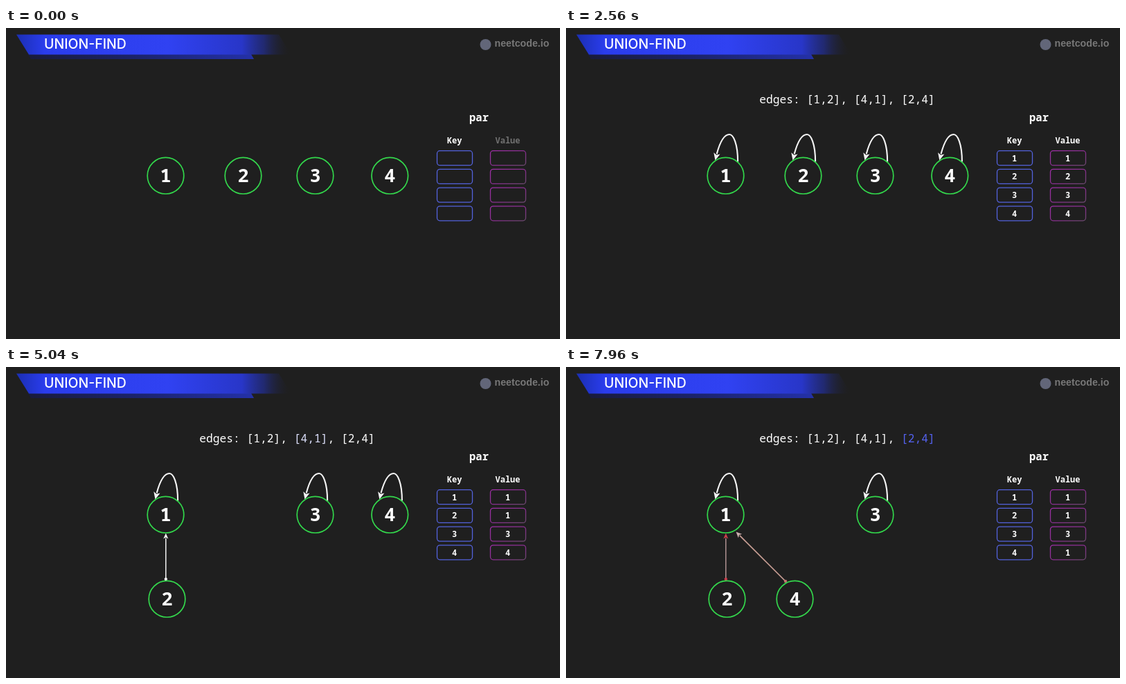
Write an HTML page that moves like this. It is 800 px wide and 450 px high and loops after 8000 ms.

```html
<!DOCTYPE html>
<html lang="en">
<head>
<meta charset="utf-8">
<title>Union-Find</title>
<style>
  html, body { margin: 0; width: 100%; height: 100%; overflow: hidden; background: #1f1f1f; }
  svg { display: block; width: 100vw; height: 100vh; }
  text { fill: #fff; }
  .mono { font-family: "Noto Sans Mono", "DejaVu Sans Mono", monospace; }
  .mid { text-anchor: middle; }
  .blend { isolation: isolate; }
  .blend > g { mix-blend-mode: plus-lighter; }
</style>
</head>
<body>
<svg id="stage" viewBox="0 0 800 450" xmlns="http://www.w3.org/2000/svg">
  <defs>
    <linearGradient id="bar" gradientUnits="userSpaceOnUse" x1="16" y1="0" x2="412" y2="0">
      <stop offset="0" stop-color="#1b2fb4"/>
      <stop offset=".1" stop-color="#2a3cec"/>
      <stop offset=".55" stop-color="#3042f2"/>
      <stop offset=".82" stop-color="#2836c8"/>
      <stop offset=".9" stop-color="#222d8c" stop-opacity=".75"/>
      <stop offset="1" stop-color="#1f1f1f" stop-opacity="0"/>
    </linearGradient>
    <linearGradient id="strip" gradientUnits="userSpaceOnUse" x1="32" y1="0" x2="358" y2="0">
      <stop offset="0" stop-color="#191b3c"/>
      <stop offset=".45" stop-color="#1b2368"/>
      <stop offset="1" stop-color="#2431a8"/>
    </linearGradient>
    <linearGradient id="purple" x1="0" y1="0" x2="1" y2="1">
      <stop offset="0" stop-color="#a02fa8"/>
      <stop offset=".6" stop-color="#86308c"/>
      <stop offset="1" stop-color="#6d4a70"/>
    </linearGradient>
    <filter id="glow" x="-30%" y="-60%" width="160%" height="220%">
      <feGaussianBlur stdDeviation="2.2"/>
    </filter>
  </defs>
  <rect width="800" height="450" fill="#1f1f1f"/>
  <path d="M32 38H354L358 45H36Z" fill="url(#strip)"/>
  <path d="M15 9.5H394L412 38.5H33Z" fill="url(#bar)"/>
  <text x="55" y="29.5" font-size="19.5" font-weight="500" font-family="Inter, sans-serif">UNION-FIND</text>
  <circle cx="692.5" cy="24" r="8" fill="#626679"/>
  <text x="705.5" y="27.3" font-size="14.2" font-weight="700" style="fill:#777" font-family="'Liberation Sans', sans-serif">neetcode.io</text>
</svg>
<script>
const LOOP = 8000;
const WHITE = [244, 244, 244], BLUE = [84, 98, 240];
const stage = document.getElementById('stage');

function el(tag, attrs, parent = stage, label) {
  const node = document.createElementNS('http://www.w3.org/2000/svg', tag);
  for (const k in attrs) node.setAttribute(k, attrs[k]);
  if (label !== undefined) node.textContent = label;
  parent.appendChild(node);
  return node;
}
const set = (node, key, value) => node.setAttribute(key, value);
const ramp = (t, from, to) => Math.min(1, Math.max(0, (t - from) / (to - from)));
const ease = (t, from, to) => { const u = ramp(t, from, to); return u * u * (3 - 2 * u); };
const mix = (a, b, u) => `rgb(${a.map((v, i) => Math.round(v + (b[i] - v) * u))})`;
const mono = (x, y, size, weight, label, mid = true) => el('text', {
  x, y, 'font-size': size, 'font-weight': weight, class: mid ? 'mono mid' : 'mono'
}, stage, label);

// Table
mono(683, 135, 15.5, 600, 'par');
mono(647.7, 167, 12, 700, 'Key');
const valueHead = mono(724.5, 167, 12, 700, 'Value');

function cell(x, y, stroke, bright) {
  const box = { x, y, width: 51, height: 21, rx: 4, fill: 'none' };
  el('rect', { ...box, stroke, 'stroke-width': 1.3 });
  const lit = el('g', { opacity: 0 });
  el('rect', { ...box, stroke: bright[0], 'stroke-width': 5, filter: 'url(#glow)' }, lit);
  el('rect', { ...box, stroke: bright[1], 'stroke-width': 2 }, lit);
  return lit;
}
const rows = [1, 2, 3, 4].map((n, i) => {
  const y = 177.7 + i * 26.7, base = y + 14.8;
  return {
    keyLit: cell(622.5, y, '#5362dc', ['#4157ff', '#a0acff']),
    valueLit: cell(699.5, y, 'url(#purple)', ['#c02fd0', '#e868ee']),
    key: mono(647.6, base, 12, 700, n),
    value: mono(724.6, base, 12, 700, n),
    next: mono(724.6, base, 12, 700, 1)
  };
});

// Edge list
const edges = mono(279.3, 108.6, 16.25, 500, '', false);
set(edges, 'xml:space', 'preserve');
edges.style.whiteSpace = 'pre';
const span = label => el('tspan', {}, edges, label);
span('edges: ');
const pairs = ['[1,2]', '[4,1]', '[2,4]'].map((label, i) => {
  if (i) span(', ');
  return span(label);
});

// Arrows
function arrow(d, width, headLen, headWide, dot) {
  const g = el('g', {});
  const line = el('path', { d, fill: 'none', 'stroke-width': width }, g);
  const h = headWide / 2;
  const head = el('path', { d: `M0 0L${-headLen} ${h}L${-headLen * 0.75} 0L${-headLen} ${-h}Z` }, g);
  const start = dot && el('circle', { cx: dot[0], cy: dot[1], r: 2.2 }, g);
  const total = line.getTotalLength();
  return {
    draw(u, alpha = 1, lineColor = mix(WHITE, WHITE, 0), headColor = lineColor, dotColor = headColor) {
      set(g, 'opacity', u > 0 ? alpha : 0);
      const at = total * u, back = Math.max(0, at - headLen * 0.9);
      const tip = line.getPointAtLength(at);
      const tail = line.getPointAtLength(Math.max(0, Math.min(at - 1, back)));
      const first = line.getPointAtLength(1), zero = line.getPointAtLength(0);
      const angle = at > 1.5
        ? Math.atan2(tip.y - tail.y, tip.x - tail.x)
        : Math.atan2(first.y - zero.y, first.x - zero.x);
      set(line, 'stroke-dasharray', `${back} ${total + 9}`);
      set(line, 'stroke', lineColor);
      set(head, 'transform', `translate(${tip.x} ${tip.y}) rotate(${angle * 180 / Math.PI})`);
      set(head, 'fill', headColor);
      if (start) set(start, 'fill', dotColor);
    }
  };
}
const homeX = [230.5, 342.5, 446.5, 554.3], homeY = 213.7;
const loops = homeX.map(x => arrow(
  `M${x + 17.6} 193.5C${x + 17.6} 167 ${x + 11} 154 ${x + 5.5} 154C${x - 3} 154 ${x - 10} 168 ${x - 15} 191.5`,
  2.1, 10.5, 9.5));
const link2 = arrow('M230.8 307V240.5', 1.5, 8, 7, [230.8, 307]);
const link4 = arrow('M317 310L245.5 238.5', 1.7, 8.5, 7.5, [317, 310]);

// Nodes: overlapping copies along the shutter time give motion blur
const COPIES = 4, SHUTTER = 10;
function node(n, copies) {
  const group = el('g', { class: 'blend' });
  return Array.from({ length: copies }, () => {
    const g = el('g', { opacity: 1 / copies }, group);
    el('circle', { r: 26.3, fill: 'none', stroke: '#32d74b', 'stroke-width': 1.7 }, g);
    el('text', { y: 9.6, 'font-size': 27, 'font-weight': 600, class: 'mono mid' }, g, n);
    return g;
  });
}
const nodes = [1, 2, 3, 4].map(n => node(n, n % 2 ? 1 : COPIES));
const place = (g, x, y) => set(g, 'transform', `translate(${x} ${y})`);
[0, 2].forEach(i => place(nodes[i][0], homeX[i], homeY));

const bend = (a, b, c, u) => a * (1 - u) ** 2 + 2 * b * u * (1 - u) + c * u * u;
const path2 = t => {
  const u = ease(t, 3120, 3820);
  return [bend(342.5, 347, 232.5, u), bend(homeY, 400, 335.7, u)];
};
const path4 = t => {
  const u = ease(t, 5510, 6210);
  return [554.3 + (330.5 - 554.3) * u, homeY + (335.7 - homeY) * u];
};
function move(copies, path, t) {
  copies.forEach((g, i) => place(g, ...path(t + (i / (COPIES - 1) - 0.5) * SHUTTER)));
}

// Row whose parent changes to 1; t0 is the moment the row lights up
function update(row, t, t0, fade) {
  const lit = ease(t, t0, t0 + 160) * (1 - ease(t, t0 + 800, t0 + 1000));
  set(row.keyLit, 'opacity', lit);
  set(row.valueLit, 'opacity', lit);
  set(row.value, 'opacity', fade * (1 - ramp(t, t0 + 80, t0 + 280)));
  set(row.next, 'opacity', ramp(t, t0 + 290, t0 + 550));
}

function render(t) {
  set(valueHead, 'opacity', 0.36 + 0.64 * ramp(t, 0, 280));

  rows.forEach((row, i) => {
    const fade = ramp(t, 680 + 240 * i, 1080 + 240 * i);
    set(row.key, 'opacity', fade);
    set(row.value, 'opacity', fade);
    set(row.next, 'opacity', 0);
    if (i === 1) update(row, t, 4000, fade);
    if (i === 3) update(row, t, 6440, fade);
  });

  loops.forEach((loop, i) => {
    const from = 320 + 360 * i;
    const gone = i === 1 ? ramp(t, 2880, 3080) : i === 3 ? ramp(t, 5270, 5470) : 0;
    loop.draw(ease(t, from, from + 390), 1 - gone);
  });

  set(edges, 'opacity', ramp(t, 1960, 2360));
  pairs.forEach((pair, i) => {
    const on = 2600 + 2400 * i;
    const tint = ramp(t, on, on + 200) * (i < 2 ? 1 - ramp(t, on + 2200, on + 2400) : 1);
    pair.style.fill = mix([255, 255, 255], BLUE, i === 2 ? ramp(t, 7240, 7440) : tint);
  });

  const warm = ramp(t, 7600, 7960);
  const hue = (r, g, b) => mix(WHITE, [r, g, b], warm);
  link2.draw(ease(t, 3980, 4380), 1, hue(176, 146, 146), hue(200, 62, 74));
  link4.draw(ease(t, 6370, 6770), 1, hue(200, 158, 148), hue(204, 178, 176), hue(192, 112, 112));

  move(nodes[1], path2, t);
  move(nodes[3], path4, t);
}

const began = performance.now();
function tick() {
  render((performance.now() - began) % LOOP);
  requestAnimationFrame(tick);
}
render(0);
requestAnimationFrame(tick);
</script>
</body>
</html>
```
